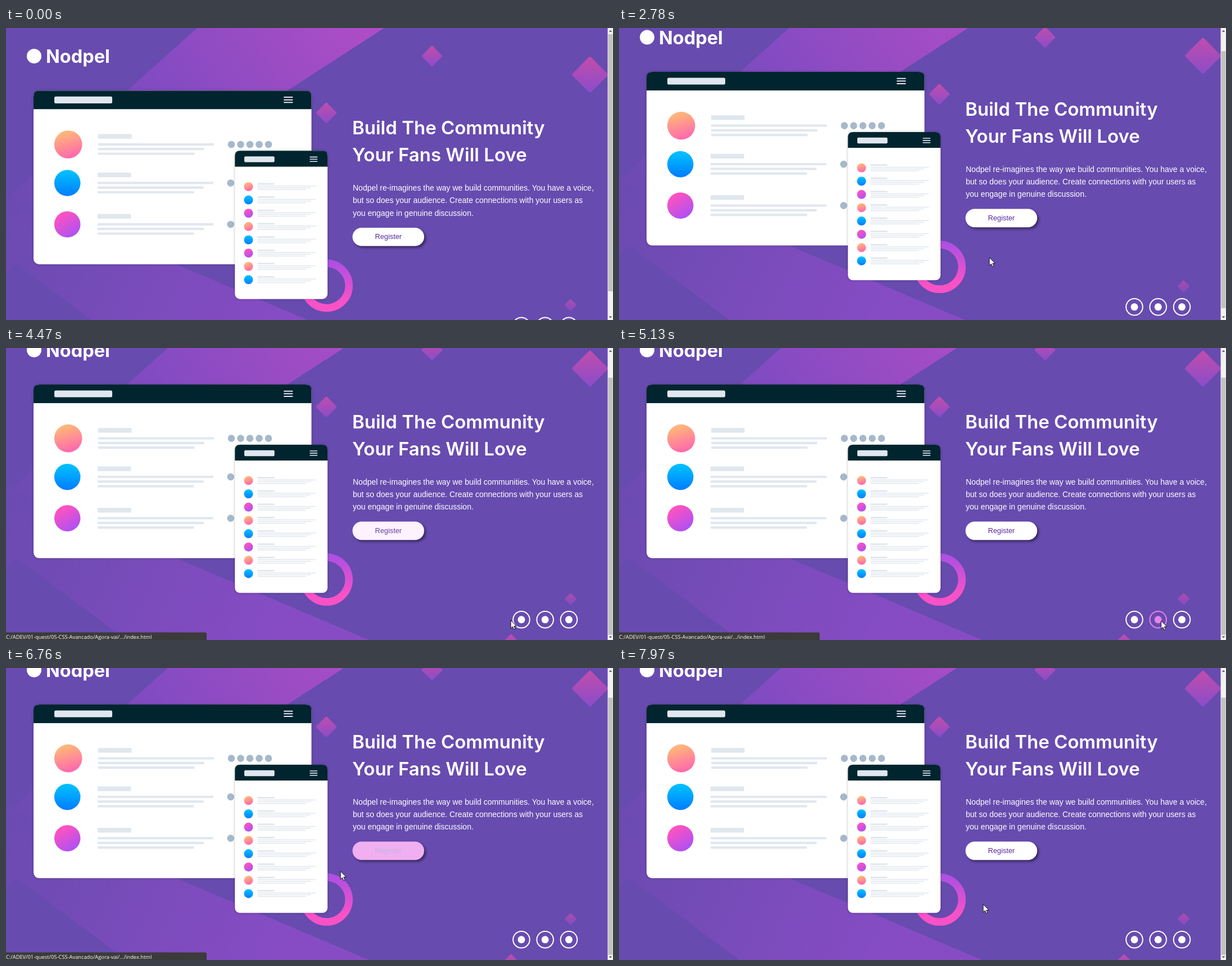
An HTML page for the animation above (8 s loop, 1080 by 519 pixels).

```html
<!DOCTYPE html>
<html lang="en">
<head>
<meta charset="utf-8">
<title>Landing page</title>
<style>
  html, body { margin: 0; width: 100%; height: 100%; overflow: hidden; background: #674baf; }
  svg { display: block; width: 100%; height: 100%; }
  .head { font: 600 33px Inter, sans-serif; fill: #fff; }
  .logo { font: 700 32.5px Inter, sans-serif; fill: #fff; }
  .body { font: 14px "Liberation Sans", Arial, sans-serif; fill: #fff; }
  .btn { font: 12.8px "Liberation Sans", Arial, sans-serif; text-anchor: middle; }
  .ui { font: 9px "Open Sans", "Noto Sans", sans-serif; fill: #fff; }
  .soft { filter: drop-shadow(0 0 2px #0004); }
  .lift { filter: drop-shadow(3px 3px 2px #0007); }
  .pop { filter: drop-shadow(0 3px 5px #0008); }
</style>
</head>
<body>
<svg viewBox="0 0 1080 519" preserveAspectRatio="none">
  <defs>
    <linearGradient id="bandA" gradientUnits="userSpaceOnUse" x1="620" y1="-20" x2="40" y2="360">
      <stop offset="0" stop-color="#ad4dc5"/><stop offset=".5" stop-color="#844bc2"/><stop offset="1" stop-color="#6c4bb2"/>
    </linearGradient>
    <linearGradient id="bandB" gradientUnits="userSpaceOnUse" x1="0" y1="350" x2="480" y2="560">
      <stop offset="0" stop-color="#6b4bb1"/><stop offset="1" stop-color="#874cc4"/>
    </linearGradient>
    <linearGradient id="orange" x1=".35" y1="0" x2=".65" y2="1">
      <stop offset=".1" stop-color="#ffb47a"/><stop offset=".9" stop-color="#ff6daa"/>
    </linearGradient>
    <linearGradient id="blue" x1="0" y1="0" x2="0" y2="1">
      <stop offset=".1" stop-color="#00bdff"/><stop offset=".95" stop-color="#0080ff"/>
    </linearGradient>
    <linearGradient id="pink" x1=".2" y1="0" x2=".8" y2="1">
      <stop offset=".1" stop-color="#ff52bf"/><stop offset=".95" stop-color="#ac51f5"/>
    </linearGradient>
    <linearGradient id="ring" x1="0" y1="0" x2="0" y2="1">
      <stop offset="0" stop-color="#b04fe2"/><stop offset=".85" stop-color="#f952c6"/>
    </linearGradient>
    <linearGradient id="gem" x1="0" y1="0" x2="1" y2="1">
      <stop offset="0" stop-color="#c24dab"/><stop offset="1" stop-color="#8a4cca"/>
    </linearGradient>
  </defs>
  <rect width="1080" height="519" fill="#674baf"/>
  <g id="page">
    <path fill="url(#bandA)" d="M340 0H673L0 434V304Z"/>
    <path fill="url(#bandB)" d="M0 292L650 567H216L0 406Z"/>
    <g id="gems"></g>
    <circle cx="570.5" cy="458" r="39.7" fill="none" stroke="url(#ring)" stroke-width="13.5"/>
    <g id="art"></g>
    <circle cx="50" cy="50" r="13" fill="#fff"/>
    <text class="logo" x="71" y="62">Nodpel</text>
    <text class="head" x="616" y="189">Build The Community</text>
    <text class="head" x="616" y="237">Your Fans Will Love</text>
    <text class="body" x="617" y="289">Nodpel re-imagines the way we build communities. You have a voice,</text>
    <text class="body" x="617" y="311.4">but so does your audience. Create connections with your users as</text>
    <text class="body" x="617" y="333.8">you engage in genuine discussion.</text>
    <rect id="btn" class="lift" x="616.5" y="355" width="127.5" height="32.6" rx="16.3"/>
    <text id="btnText" class="btn" x="680.3" y="375.4">Register</text>
    <g id="social"></g>
  </g>
  <rect x="1070.5" width="9.5" height="519" fill="#f1f1f1"/>
  <path fill="#505050" d="M1072.7 6.7L1075.5 3.7L1078.3 6.7ZM1072.7 512.5L1075.5 515.5L1078.3 512.5Z"/>
  <rect id="thumb" x="1071.5" y="11" width="8" height="457" fill="#c1c1c1"/>
  <g id="status">
    <path d="M0 505.5H354Q357 505.5 357 508.5V519H0Z" fill="#3b3b3b"/>
    <text class="ui" x="0" y="517" style="font-size:9.3px">C:/ADEV/01-quest/05-CSS-Avancado/Agora-vai/.../index.html</text>
  </g>
  <g id="menu">
    <rect class="pop" x="578.5" y="-30" width="343" height="398.5" rx="3" fill="#4a4a4a" stroke="#3c3c3c"/>
    <rect id="hot" x="580" y="343" width="338" height="24" rx="2" fill="#5e5e5e"/>
    <g id="items"></g>
  </g>
  <path id="cursor" d="M0 0V14.2L3.3 11.2L5.5 16.3L7.9 15.2L5.7 10.3H10.2Z" fill="#fff" stroke="#111" stroke-width="1" stroke-linejoin="round"/>
</svg>
<script>
const LOOP = 8000;
const $ = id => document.getElementById(id);
const rect = (x, y, w, h, fill, r = 0) =>
  `<rect x="${x}" y="${y}" width="${w}" height="${h}" rx="${r}" fill="${fill}"/>`;
const disc = (x, y, r, fill) => `<circle cx="${x}" cy="${y}" r="${r}" fill="${fill}"/>`;
const hues = ['url(#orange)', 'url(#blue)', 'url(#pink)'];
const PALE = '#e0e7ee', DOT = '#a6b8ca', DARK = '#00252e';

function gem(x, y, half, opacity = 1) {
  const s = (half + 1) * Math.SQRT2;
  return `<rect x="${-s / 2}" y="${-s / 2}" width="${s}" height="${s}" rx="${s / 14}" fill="url(#gem)"
    opacity="${opacity}" transform="translate(${x} ${y}) rotate(45)"/>`;
}

function frame(x, y, w, h, bar, r) {
  return `<rect class="soft" x="${x}" y="${y}" width="${w}" height="${h}" rx="${r}" fill="#fff"/>
    <path d="M${x} ${y + bar}V${y + r}q0 ${-r} ${r} ${-r}h${w - 2 * r}q${r} 0 ${r} ${r}V${y + bar}Z" fill="${DARK}"/>`;
}

const burger = (x, y, w, gap, h) =>
  [-1, 0, 1].map(i => rect(x, y + i * gap - h / 2, w, h, '#e6e2f4', h / 2)).join('');

function wideRow(i) {
  const y = [207, 275.5, 349][i], x = i ? 163 : 164;
  let s = disc(i ? 109.2 : 110.7, y, i ? 23.3 : 24.8, hues[i]);
  s += rect(x, y - 18.6, 59.5, 8.4, PALE, 1);
  [206, 188.7, 171.5].forEach((w, k) => s += rect(x, y - 2.2 + k * 8.3, w, 4.2, PALE, 1));
  for (let k = 0; k < (i ? 1 : 5); k++) s += disc((i ? 399.7 : 401) + k * 16.5, y, 6.3, DOT);
  return s;
}

function slimRow(i) {
  const y = 282 + i * 23.62;
  let s = disc(431.5, y, 8, hues[i % 3]) + rect(447.5, y - 6.4, 30, 2.9, PALE);
  [103.5, 95, 86.5].forEach((w, k) => s += rect(447.5, y - 1.8 + k * 3.1, w, 1.5, PALE));
  return s;
}

$('gems').innerHTML = gem(758, 50, 18) + gem(1039, 83, 32) + gem(570, 151, 18) +
  gem(1004.5, 492.5, 10, .75) + gem(898.5, 566, 10.5);
$('art').innerHTML =
  frame(49, 111.5, 494.5, 308.5, 32.8, 10) + rect(86, 121.8, 103, 12.2, PALE, 2.5) +
  burger(494, 127.7, 16.5, 4.6, 2) + [0, 1, 2].map(wideRow).join('') +
  frame(407.3, 218.3, 164.8, 263.4, 28.2, 9) + rect(424, 228.2, 53.7, 10.4, PALE, 2) +
  burger(540.3, 233.3, 14, 3.9, 1.6) + [...Array(8).keys()].map(slimRow).join('');
$('social').innerHTML = [917, 959.2, 1001.5].map(x =>
  `<g><circle cx="${x}" cy="529.2" r="14.8" fill="none" stroke-width="2" stroke="currentColor"/>` +
  disc(x, 529.2, 6.5, 'currentColor') + '</g>').join('');

// Menu rows: centre y, label, shortcut, icon
const rows = [
  [3.5, 'Voltar', 'Alt+Seta para a esquerda', 'M6 0H-6M-1-5L-6 0L-1 5'],
  [28.5, 'Avançar', 'Alt+Seta para a direita', 'M-6 0H6M1-5L6 0L1 5'],
  [54, 'Atualizar', 'Ctrl+R', 'M5.2-3A6 6 0 1 0 6 0M5.6-6V-2.7H2.3'],
  [83.5, 'Salvar como', 'Ctrl+S', 'M-5.5-5.5H3L5.5-3V5.5H-5.5ZM-3-5.5V-2H2V-5.5M-3 5.5V1H3V5.5'],
  [109, 'Imprimir', 'Ctrl+P', 'M-3.5-2V-5.5H3.5V-2M-3.5 3H-6V-2H6V3H3.5M-3.5 1H3.5V5.5H-3.5Z'],
  [134.5, 'Transmitir mídia para um dispositivo', '', 'M-6-2V-4.5H6V4.5H1M-6 .5A4 4 0 0 1-2 4.5M-6 3A1.5 1.5 0 0 1-4.5 4.5'],
  [160, 'Ler em voz alta', 'Ctrl+Shift+U', 'M-6 5L-2.3-5L1.5 5M-4.7 1.7H.2M2.5-4.5Q4-3 2.8-1M4.3-6Q7-3 4.8 0'],
  [185.5, 'Traduzir para português', '', ''],
  [215, 'Adicionar página a Coleções', '', 'M2.5-3V-5.5H-5.5V3H-3M-3-3H6V6H-3ZM1.5-1V4M-1 1.5H4'],
  [244.5, 'Compartilhar', '', 'M-1-4.5H-5.5V5.5H4.5V2M-2 2Q-2-2.5 4.5-2.5M2-5.5L5.5-2.5L2 .5'],
  [274, 'Seleção da web', 'Ctrl+Shift+X', 'M-3-5.5H-5.5V-3M-5.5-1V1.5M-5.5 3V5.5H-3M-1-5.5H1.5M3-5.5H5.5V-3M5.5-1V1M-1 5.5H1M3.5 2V6.5M1.2 4.2H6'],
  [299.5, 'Captura da web', 'Ctrl+Shift+S', 'M-5.5-3H-3L-2-5.5H2L3-3H5.5V5.5H-5.5ZM2.5 1A2.5 2.5 0 1 1-2.5 1A2.5 2.5 0 1 1 2.5 1'],
  [329, 'Fonte da página de exibição', 'Ctrl+U', ''],
  [354.5, 'Inspecionar', '', 'M-1 3.5H-6V-5H6V1M1 0L6 3.5L3.3 4L2 6.5Z']
];
$('items').innerHTML = rows.map(([y, label, keys, icon], i) =>
  `<g opacity="${i < 2 ? .5 : 1}"><text class="ui" x="612.3" y="${y + 3.3}">${label}</text>
   <text class="ui" x="890" y="${y + 3.3}" text-anchor="end">${keys}</text>
   <path d="${icon}" transform="translate(596.7 ${y})" fill="none" stroke="#fff" stroke-width="1.1"/></g>`).join('') +
  [68.3, 199.7, 229.5, 258.8, 313.7].map(y => rect(579, y - .5, 342, 1, '#6a6a6a')).join('') +
  '<text class="ui" x="590" y="188.5" style="font-family:\'Open Sans\',\'Noto Sans CJK JP\',sans-serif">aあ</text>' +
  '<path d="M903 211L907 215L903 219" fill="none" stroke="#fff" stroke-width="1.1"/>';

// Pointer path: time, x, y
const path = [
  [850, 1070, 509], [915, 1057, 506], [980, 1040, 530], [1449, 1040, 530],
  [1450, 1026, 517], [1580, 990, 502], [1710, 965, 494], [1970, 965, 494],
  [2170, 800, 448], [2380, 659, 408], [3390, 659, 408], [3480, 668, 380],
  [3580, 680, 338], [3870, 687, 327], [4200, 687, 327], [4270, 716, 348],
  [4400, 845, 455], [4470, 898, 484], [4700, 918, 485], [4850, 944, 485],
  [4990, 959, 485], [5060, 959, 485], [5350, 982, 485], [5740, 1000, 485],
  [5870, 1000, 485], [5940, 860, 440], [6010, 707, 382], [6120, 692, 345],
  [6240, 686, 330], [6620, 645, 339], [6710, 615, 352], [6800, 580, 368.5],
  [7160, 580, 368.5], [7310, 592, 356], [7500, 592, 356], [7780, 635, 405],
  [7960, 648, 420], [LOOP, 648, 420]
];
const scrolls = [[2780, 33.4], [2870, 41], [2960, 45], [3060, 46.4]];

const clamp = v => Math.max(0, Math.min(1, v));
const ease = v => v * v * (3 - 2 * v);
const pulse = (t, on, off, d = 300) =>
  ease(Math.min(clamp((t - on) / d), 1 - clamp((t - off) / d)));
const mix = (a, b, k) => `rgb(${a.map((v, i) => Math.round(v + (b[i] - v) * k))})`;
const WHITE = [255, 255, 255], ROSE = [232, 130, 232], PLUM = [88, 42, 156];

function pointer(t) {
  const i = path.findIndex(p => p[0] > t);
  if (i < 1) return i ? path[path.length - 1].slice(1) : [1100, 540];
  const [t0, x0, y0] = path[i - 1], [t1, x1, y1] = path[i];
  const k = (t - t0) / (t1 - t0);
  return [x0 + (x1 - x0) * k, y0 + (y1 - y0) * k];
}

function draw(t) {
  const top = scrolls.reduce((v, [at, y]) => t >= at ? y : v, 0);
  $('page').setAttribute('transform', `translate(0 ${-top})`);
  $('thumb').setAttribute('y', 11 + top * .9);

  const [x, y] = pointer(t);
  $('cursor').setAttribute('transform', `translate(${x} ${y})`);

  const hover = Math.max(pulse(t, 3560, 4230), pulse(t, 6140, 6640));
  $('btn').setAttribute('fill', mix(WHITE, ROSE, hover));
  $('btnText').setAttribute('fill', mix(PLUM, WHITE, hover));
  [[4530, 4840], [4850, 5370], [5380, 5900]].forEach(([on, off], i) => {
    $('social').children[i].style.color = mix(WHITE, ROSE, pulse(t, on, off));
  });

  $('status').setAttribute('opacity', Math.max(
    pulse(t, 3600, 4520, 120), pulse(t, 4560, 6060, 120), pulse(t, 6180, 6780, 120)));
  $('menu').setAttribute('opacity', pulse(t, 6820, 7780, 130));
  $('hot').setAttribute('opacity', t > 7200 && y < 368 ? 1 : 0);
}

const start = performance.now();
function tick() {
  draw((performance.now() - start) % LOOP);
  requestAnimationFrame(tick);
}
tick();
</script>
</body>
</html>
```
